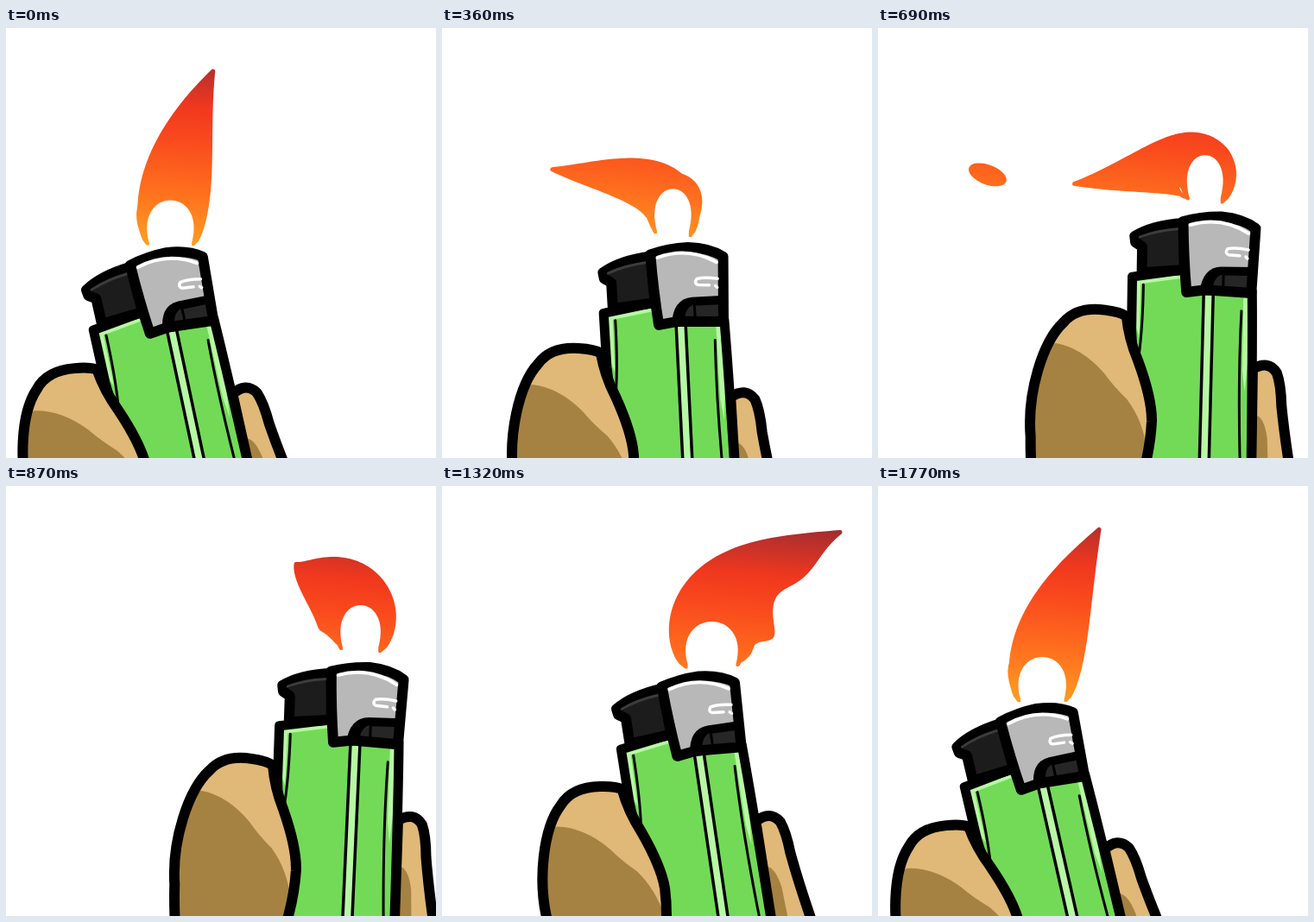
Recreate the animation shown at these times as an HTML page with a canvas. Size 498 px wide and 498 px high, loop 1.8 s.

```html
<!DOCTYPE html>
<html lang="en">
<head>
<meta charset="utf-8">
<title>Lighter</title>
<style>
html, body { margin: 0; width: 100%; height: 100%; overflow: hidden; background: #fff; }
canvas { display: block; }
</style>
</head>
<body>
<canvas id="stage" width="498" height="498"></canvas>
<script>
const ctx = document.getElementById('stage').getContext('2d');
const { sin, cos, PI, max, min, hypot } = Math;
const LOOP = 1800, STEP = 30, PEAK = 870;
const GREEN = '#73da58', LIGHT = '#b8f7a4', TAN = '#e0b878', BROWN = '#a58242';

// Periodic value: a mean plus the first two harmonics of the swing
const wave = (p, mean, c, s, c2, s2) =>
  mean + c * cos(p) + s * sin(p) + c2 * cos(2 * p) + s2 * sin(2 * p);

const swing = p => ({
  x: wave(p, 253, 118, -5, 0, 4),
  y: wave(p, 239.5, -30, -11, 0, 3),
  tilt: wave(p, 5.2, -7, 3, 0, -1.5)
});

// Heat colours stay fixed to the stage, slightly tilted
const heat = ctx.createLinearGradient(0, -20, -20.7, 238.3);
heat.addColorStop(0, '#6c2936');
heat.addColorStop(0.2, '#bb302c');
heat.addColorStop(0.36, '#f0381e');
heat.addColorStop(0.5, '#f9481d');
heat.addColorStop(0.75, '#ff701e');
heat.addColorStop(1, '#ffa022');

function bezier(a, b, c, d, s) {
  const r = 1 - s;
  return a.map((v, i) => r * r * r * v + 3 * r * r * s * b[i]
    + 3 * r * s * s * c[i] + s * s * s * d[i]);
}

// Arch standing on both feet
function arch(x, y, foot, spread, rise) {
  ctx.moveTo(x - foot, y);
  ctx.bezierCurveTo(x - foot - spread, y - rise, x + foot + spread, y - rise, x + foot, y);
}

// A tapering ribbon along a bent spine, over an arch with a hollow in it
function drawFlame(p, pose) {
  const lean = wave(p, -5, -78, 170, 0, 0);
  const height = wave(p, 146, -50, 56, 25, 42);
  const bend = wave(p, -12, -45, 62, 0, -28);
  const width = 35 + 11 * sin(p + 0.3);
  const foot = 25 + 0.03 * lean;
  const x = pose.x + 48 + 0.1 * lean, y = pose.y - 22;

  const root = [x, y];
  const rise = [x + 4 - 0.06 * lean, y - 68];
  const neck = [x + bend, y - 0.62 * (height - 22) - 15];
  const tip = [pose.x + 48 + lean, pose.y - height + 2];
  const at = s => bezier(root, rise, neck, tip, s);

  const left = [], right = [], N = 48;
  for (let i = 0; i <= N; i++) {
    const s = i / N, [px, py] = at(s);
    const [ax, ay] = at(s - 0.01), [bx, by] = at(s + 0.01);
    const d = hypot(bx - ax, by - ay);
    const nx = (by - ay) / d, ny = (ax - bx) / d;
    const w = foot * (1 - s) ** 3 + width * sin(PI * s ** 0.75);
    const ripple = 10 * max(0, sin(p)) * sin(PI * s)
      * cos(14 * (s - 0.65) - 5.6 * (p - 2.2));
    left.push([px + nx * w, py + ny * w]);
    right.unshift([px - nx * (w + ripple), py - ny * (w + ripple)]);
  }

  ctx.fillStyle = ctx.strokeStyle = heat;
  ctx.lineWidth = 5;
  ctx.beginPath();
  [...left, ...right].forEach(q => ctx.lineTo(...q));
  ctx.closePath();
  ctx.fill();
  ctx.stroke();
  ctx.beginPath();
  arch(x, y, foot, 50, 88);
  ctx.fill();
  ctx.stroke();

  ctx.fillStyle = '#fff';
  ctx.beginPath();
  arch(x, y, foot - 2, 18, 66);
  ctx.lineTo(x + foot - 2, y + 8);
  ctx.lineTo(x - foot + 2, y + 8);
  ctx.fill();
}

// Shred of flame that breaks off, drifts and shrinks away
function drawShred(t, from, to, p, q, size, tilt) {
  const s = (t - from) / (to - from);
  if (s <= 0 || s >= 1) return;
  const k = min(1, 1.8 * (1 - s), 4 * s);
  ctx.beginPath();
  ctx.ellipse(p[0] + (q[0] - p[0]) * s, p[1] + (q[1] - p[1]) * s,
    size * k, size * k * 0.5, tilt, 0, PI * 2);
  ctx.fillStyle = heat;
  ctx.fill();
}

const shape = d => new Path2D(d);
const art = {
  finger: shape('M434 388Q452 377 462 392Q467 405 468 430Q472 465 480 510L492 590H434Z'),
  fingerShade: shape('M436 441Q448 441 452 468L457 590H436Z'),
  body: shape('M293 283L352 274L432 298Q434 380 434 590H310L293 345Z'),
  bodyGleam: shape('M297 287L349 280V284L303 291L302 352L297 338Z'),
  stripe: shape('M376 298H387L384 590H372Z'),
  stripeLines: shape('M376 298L373 590M387 300L384 590'),
  sideGleam: shape('M422 304H428L429 370L425 414L422 390Z'),
  sideLines: shape('M306 292Q306 340 302 374M420 321Q417 400 421 500L422 590'),
  hood: shape('M295 236Q315 223 351 220L353 274L304 278V248L296 243Z'),
  hoodGleam: shape('M301 237Q320 229 345 227'),
  cap: shape('M351 218Q372 212 395 212Q420 214 435 225L431 300L378 297L356 300Q352 260 351 218Z'),
  hole: shape('M371 300Q374 271 396 270H434L432 304L371 303Z'),
  holeIn: shape('M386 298Q387 282 397 279V297ZM400 280H427V298L400 296Z'),
  shine: shape('M359 222Q395 211 427 231'),
  mark: shape('M427 250Q412 247 403 249Q399 254 404 256L417 257M424 258L426 260'),
  thumb: shape('M190 590Q178 520 178 470C173 420 190 360 214 337Q230 318 262 322Q280 324 287 329Q290 355 301 380Q318 424 318 450Q317 480 308 515L302 590Z'),
  thumbShade: shape('M160 425Q187 362 206 361Q236 366 262 395Q274 411 289 425Q308 450 312 480V600H160Z')
};

function fill(p, color) {
  ctx.fillStyle = color;
  ctx.fill(p);
}
function line(p, width, color = '#000') {
  ctx.strokeStyle = color;
  ctx.lineWidth = width;
  ctx.stroke(p);
}
function shaded(p, shade) {
  fill(p, TAN);
  ctx.save();
  ctx.clip(p);
  fill(shade, BROWN);
  ctx.restore();
  line(p, 12);
}

function drawLighter({ x, y, tilt }) {
  ctx.save();
  ctx.translate(x, y);
  ctx.rotate(-tilt * PI / 180);
  ctx.transform(1, 0, tilt * 0.0016, 1, 0, 0);
  ctx.translate(-345, -213);

  shaded(art.finger, art.fingerShade);

  fill(art.body, GREEN);
  fill(art.bodyGleam, LIGHT);
  fill(art.stripe, LIGHT);
  fill(art.sideGleam, LIGHT);
  line(art.stripeLines, 3.5);
  line(art.sideLines, 3);
  line(art.body, 11);

  fill(art.hood, '#1c1c1c');
  line(art.hood, 12);
  line(art.hoodGleam, 3, '#3c3c3c');

  fill(art.cap, '#b8b8b8');
  fill(art.hole, '#000');
  fill(art.holeIn, '#262626');
  line(art.cap, 12);
  line(art.shine, 4, '#fff');
  line(art.mark, 3.5, '#fff');

  shaded(art.thumb, art.thumbShade);
  ctx.restore();
}

function draw(now) {
  const t = Math.floor((now % LOOP) / STEP) * STEP;
  const p = (t - PEAK) / LOOP * 2 * PI;
  const pose = swing(p);
  ctx.fillStyle = '#fff';
  ctx.fillRect(0, 0, 498, 498);
  ctx.lineJoin = ctx.lineCap = 'round';
  drawFlame(p, pose);
  drawShred(t, 570, 840, [130, 177], [123, 161], 23, 0.36);
  drawShred(t, 1560, 1710, [372, 52], [386, 26], 15, -0.5);
  drawLighter(pose);
}

let start;
function tick(now) {
  if (start === undefined) start = now;
  draw(now - start);
  requestAnimationFrame(tick);
}
draw(0);
requestAnimationFrame(tick);
</script>
</body>
</html>
```
